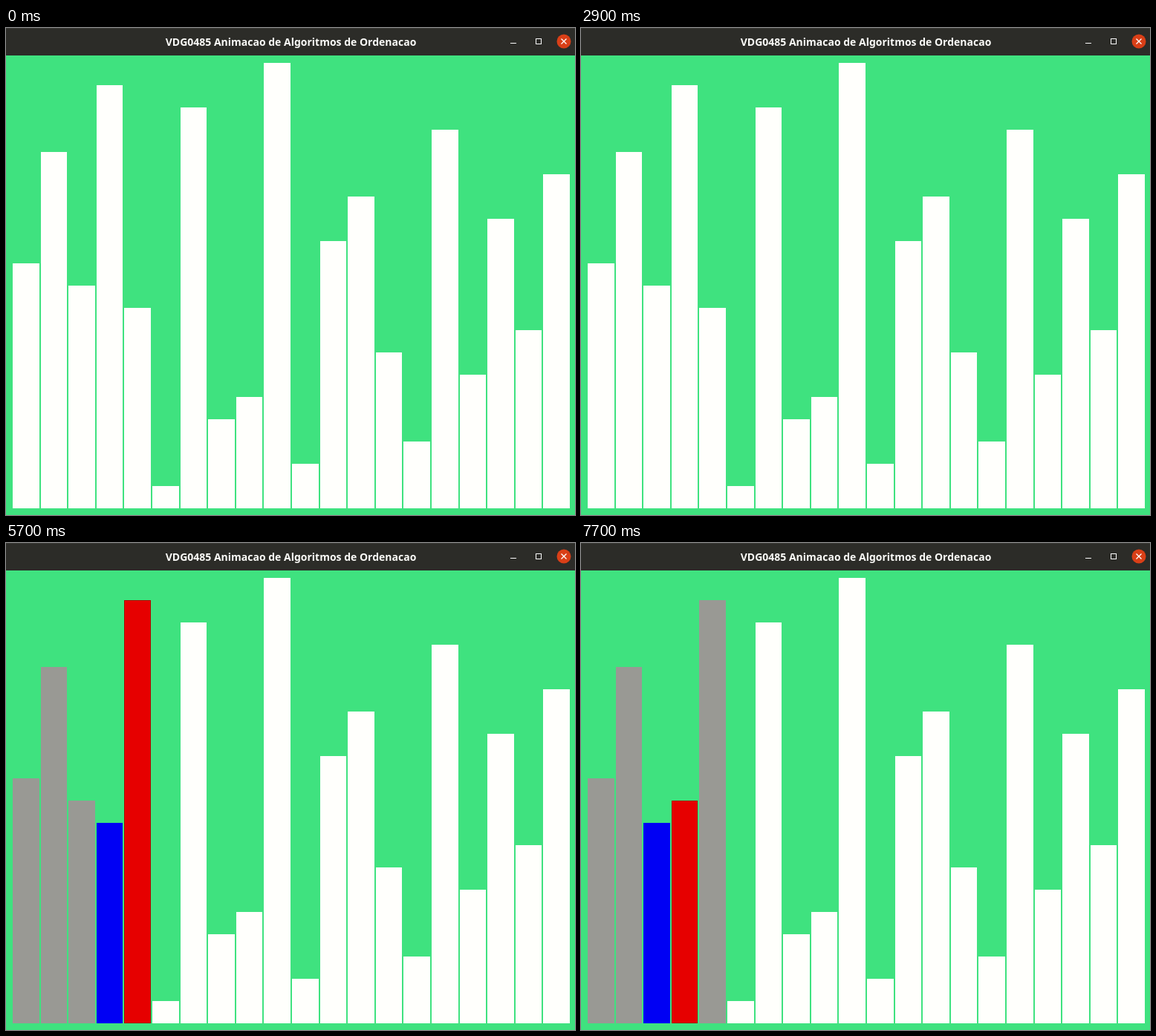
These frames come from a looping animation (766x656 px, 8000 ms). An HTML page:

```html
<!DOCTYPE html>
<html lang="pt">
<head>
<meta charset="utf-8">
<title>Ordenacao</title>
<style>
  html, body { margin: 0; width: 100%; height: 100%; overflow: hidden; }
  #stage { position: relative; width: 766px; height: 656px; overflow: hidden; background: #3fe27f; }
  svg { position: absolute; left: 0; top: 0; display: block; }
  text { font: 700 14px "Noto Sans", "Open Sans", sans-serif; fill: #fafaf7; text-anchor: middle; }
  .bar { position: absolute; bottom: 9px; box-sizing: border-box; border: 1px solid; }
</style>
</head>
<body>
<div id="stage">
  <svg width="766" height="37" viewBox="0 0 766 37">
    <rect width="766" height="37" fill="#2c2c28"/>
    <rect width="766" height="1" fill="#3a3a36"/>
    <text x="383.5" y="24">VDG0485 Animacao de Algoritmos de Ordenacao</text>
    <rect x="679" y="20" width="8" height="1" fill="#fff"/>
    <rect x="713.5" y="14.5" width="7" height="7" fill="none" stroke="#fff"/>
    <circle cx="751" cy="18" r="9.5" fill="#d93f17"/>
    <path d="M747.5 14.5l7 7m0-7l-7 7" stroke="#fff" stroke-width="1.3"/>
  </svg>
</div>
<script>
  const LOOP = 8000, PITCH = 37.6, WIDTH = 35.6, UNIT = 30;
  const values = [11, 16, 10, 19, 9, 1, 18, 4, 5, 20, 2, 12, 14, 7, 3, 17, 6, 13, 8, 15];

  // fill and edge: idle, sorted range, left run, right run
  const colors = {
    w: ['#fffffc', '#fffffc'],
    g: ['#999994', '#999994'],
    r: ['#e60000', '#a80800'],
    b: ['#0000f4', '#0000f4']
  };

  // Per bar: time, colour and, where it is overwritten, the new value
  const steps = [
    '0w 800g 1600r 2900w 3300g',
    '0w 1200g 1600b 2900w 3300g',
    '0w 3700g 6900r 7300b9',
    '0w 4100g 4900r 5300b9 6100w 6500g 6900b 7300g 7700r10',
    '0w 4500g 4900b 5300g 5700r19 6100w 6500g 6900b 7300g'
  ];

  function look(color, value) {
    const [fill, edge] = colors[color];
    return { backgroundColor: fill, borderColor: edge, height: value * UNIT + 'px' };
  }

  function keyframes(script, value) {
    const frames = script.split(' ').map(step => {
      const [, time, color, next] = step.match(/(\d+)([wgrb])(\d*)/);
      value = +next || value;
      return { ...look(color, value), offset: time / LOOP, easing: 'step-end' };
    });
    return [...frames, { ...frames[frames.length - 1], offset: 1 }];
  }

  const stage = document.getElementById('stage');
  values.forEach((value, i) => {
    const bar = document.createElement('div');
    const left = Math.round(9 + PITCH * i);
    const right = Math.round(9 + PITCH * i + WIDTH);
    bar.className = 'bar';
    Object.assign(bar.style, look('w', value), { left: left + 'px', width: right - left + 'px' });
    stage.append(bar);
    if (steps[i]) bar.animate(keyframes(steps[i], value), { duration: LOOP, iterations: Infinity });
  });
</script>
</body>
</html>
```
